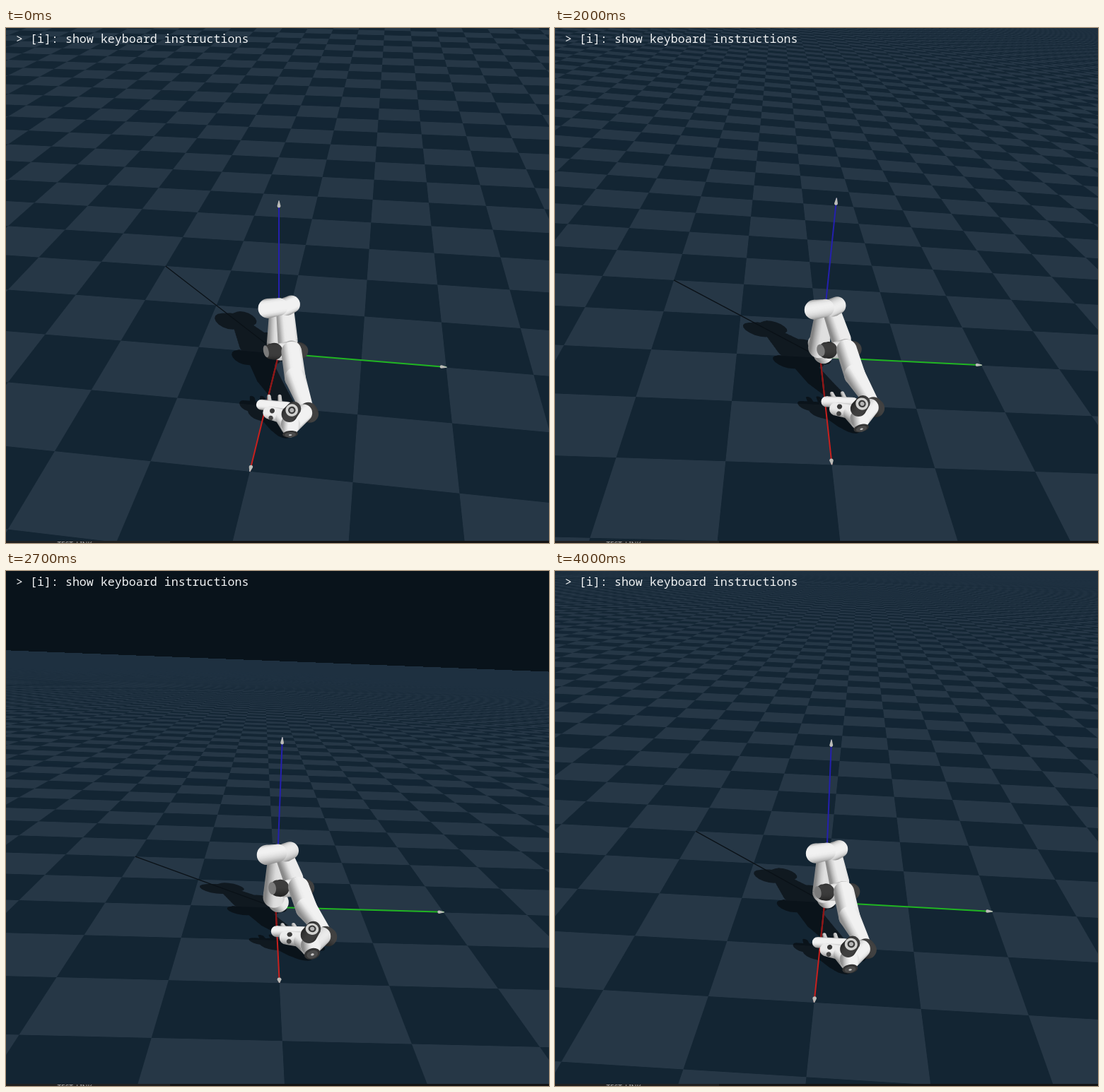
Animation, 768 px wide and 729 px high, one loop 4.2 s. Source, as an HTML page with a canvas:

```html
<!DOCTYPE html>
<html lang="en">
<head>
<meta charset="utf-8">
<title>Robot arm viewer</title>
<style>
  html, body { margin: 0; width: 768px; height: 729px; overflow: hidden; background: #09131b; }
  canvas { position: absolute; left: 0; top: 0; }
  .hint { position: absolute; left: 14px; top: 3px; font: 16.65px/24px "Noto Sans Mono", "DejaVu Sans Mono", monospace; color: #f1f3f4; white-space: pre; }
  .bar { position: absolute; left: 0; top: 726px; width: 768px; height: 3px; overflow: hidden; background: linear-gradient(90deg, #212121 232px, #141414 232px); }
  .bar span { position: absolute; left: 62px; top: 0; font: 10px/10px "Noto Sans", sans-serif; color: #a4a4a4; white-space: pre; }
</style>
</head>
<body>
<canvas id="view" width="768" height="726"></canvas>
<div class="hint">&gt; [i]: show keyboard instructions</div>
<div class="bar"><span>··  TEST_LINK</span></div>
<script>
const W = 768, H = 726, LOOP = 4200, STEP = 100;
const CX = 386, CY = 360, FOCAL = 1000, DIST = 4.06, PITCH = 0.5149;
const SA = Math.sin(0.1419), CA = Math.cos(0.1419);
const ctx = document.getElementById('view').getContext('2d');
const floor = ctx.createImageData(W, H);

// Camera drag: time, yaw, tilt
const DRAG = [
  [1200, 0, 0], [1800, 0.084, 0], [2200, 0.348, 0.225],
  [2500, 0.338, 0.374], [2900, 0.004, 0.18], [3600, 0.104, 0.134]
];

function dragAt(t, col) {
  const last = DRAG.length - 1;
  if (t <= DRAG[0][0]) return DRAG[0][col];
  if (t >= DRAG[last][0]) return DRAG[last][col];
  const slope = i => (DRAG[i + 1][col] - DRAG[i][col]) / (DRAG[i + 1][0] - DRAG[i][0]);
  const tangent = i => {
    if (i === 0 || i === last) return 0;
    const a = slope(i - 1), b = slope(i);
    return a * b > 0 ? 2 * a * b / (a + b) : 0;
  };
  let i = 0;
  while (t > DRAG[i + 1][0]) i++;
  const h = DRAG[i + 1][0] - DRAG[i][0], s = (t - DRAG[i][0]) / h, r = 1 - s;
  return DRAG[i][col] * (1 + 2 * s) * r * r + h * tangent(i) * s * r * r
    + DRAG[i + 1][col] * s * s * (3 - 2 * s) - h * tangent(i + 1) * s * s * r;
}

// Points are [right, toward, up], aligned with the starting camera
let cy, sy, cp, sp;
function setCamera(yaw, tilt) {
  cy = Math.cos(yaw); sy = Math.sin(yaw);
  cp = Math.cos(PITCH - tilt); sp = Math.sin(PITCH - tilt);
}
function rotate([x, t, z]) {
  const depth = sp * z + cp * t;
  return [x * cy + depth * sy, cp * z - sp * t, depth * cy - x * sy];
}
function project([x, t, z]) {
  const v = rotate([x, t, z - 0.5]), k = FOCAL / (DIST - v[2]);
  return [CX + v[0] * k, CY - v[1] * k, k];
}
const fromWorld = (x, y, z) => [CA * y - SA * x, CA * x + SA * y, z];
const mix = (a, b, s) => a.map((v, i) => v + (b[i] - v) * s);

// Box-filtered square wave
function wave(p, w) {
  const a = (p - w / 2) / 2, b = (p + w / 2) / 2;
  return 2 * (Math.abs(a - Math.floor(a) - 0.5) - Math.abs(b - Math.floor(b) - 0.5)) / w;
}

const DARK = [19, 37, 51], LIGHT = [38, 55, 70], HAZE = [31, 50, 68], SKY = [9, 19, 27];
const SHARP = 0.75;

function drawFloor() {
  const px = floor.data;
  const camX = -DIST * sy, camZ = 0.5 + sp * DIST * cy, camT = cp * DIST * cy;
  const toU = (x, t) => 2 * (CA * t - SA * x), toV = (x, t) => 2 * (CA * x + SA * t);
  const u0 = toU(camX, camT), v0 = toV(camX, camT);
  const zx = sp * sy, ux = toU(cy, cp * sy), vx = toV(cy, cp * sy);
  const uy = toU(0, -sp), vy = toV(0, -sp);
  let o = 0;
  for (let j = 0; j < H; j++) {
    const Y = (CY - j - 0.5) / FOCAL;
    for (let i = 0; i < W; i++, o += 4) {
      const X = (i + 0.5 - CX) / FOCAL;
      const back = X * sy - cy, dx = X * cy + sy;
      const dz = cp * Y + sp * back, dt = cp * back - sp * Y;
      let r = SKY[0], g = SKY[1], b = SKY[2];
      if (dz < -0.0005) {
        const k = -camZ / dz, U = toU(dx, dt), V = toV(dx, dt), e = SHARP * k / FOCAL;
        const wu = e * (Math.abs(ux - U * zx / dz) + Math.abs(uy - U * cp / dz)) + 1e-4;
        const wv = e * (Math.abs(vx - V * zx / dz) + Math.abs(vy - V * cp / dz)) + 1e-4;
        const m = 0.5 + 0.5 * wave(u0 + k * U, wu) * wave(v0 + k * V, wv);
        const haze = 0.5 * Math.min(1, Math.max(0, (k - 5) / 55));
        r = DARK[0] + (LIGHT[0] - DARK[0]) * m; r += (HAZE[0] - r) * haze;
        g = DARK[1] + (LIGHT[1] - DARK[1]) * m; g += (HAZE[1] - g) * haze;
        b = DARK[2] + (LIGHT[2] - DARK[2]) * m; b += (HAZE[2] - b) * haze;
      }
      px[o] = r; px[o + 1] = g; px[o + 2] = b; px[o + 3] = 255;
    }
  }
  ctx.putImageData(floor, 0, 0);
}

const LAMP = [0.49, 0.653, 0.577];
const FALL = [-0.8486, -1.1314];

function line(a, b, color, width) {
  const p = project(a), q = project(b);
  ctx.strokeStyle = color;
  ctx.lineWidth = width;
  ctx.beginPath();
  ctx.moveTo(p[0], p[1]);
  ctx.lineTo(q[0], q[1]);
  ctx.stroke();
}

function axis(x, y, z, color, inner) {
  const lift = 0.003, o = [0, 0, lift], tip = fromWorld(x, y, z + lift);
  line(o, tip, color, 2);
  if (inner) line(o, mix(o, tip, 0.45), inner, 2);
  const p = project(mix(o, tip, 0.972)), q = project(mix(o, tip, 1.004));
  const a = Math.atan2(q[1] - p[1], q[0] - p[0]), r = 0.0095 * p[2];
  const nx = -Math.sin(a) * r, ny = Math.cos(a) * r;
  ctx.fillStyle = '#bcbcb8';
  ctx.beginPath();
  ctx.arc(p[0], p[1], r, a + Math.PI / 2, a + Math.PI * 1.5);
  ctx.lineTo(q[0] - nx * 0.2, q[1] - ny * 0.2);
  ctx.lineTo(q[0] + nx * 0.2, q[1] + ny * 0.2);
  ctx.fill();
}

function capsule([a, b, ra, rb, tone]) {
  const p = project(a), q = project(b);
  const r1 = ra * p[2], r2 = rb * q[2], r = Math.max(r1, r2);
  const ang = Math.atan2(q[1] - p[1], q[0] - p[0]), h = Math.PI / 2;
  const nx = -Math.sin(ang), ny = Math.cos(ang);
  const l = rotate(LAMP), side = nx * l[0] - ny * l[1];
  const mx = (p[0] + q[0]) / 2, my = (p[1] + q[1]) / 2;
  const fill = ctx.createLinearGradient(mx - nx * r, my - ny * r, mx + nx * r, my + ny * r);
  for (let i = 0; i <= 8; i++) {
    const s = i / 4 - 1, lit = s * side + Math.sqrt(1 - s * s) * l[2];
    const c = Math.round(241 * tone * Math.min(1, 0.58 + 0.58 * Math.max(0, lit)));
    fill.addColorStop(i / 8, `rgb(${c},${c},${c})`);
  }
  ctx.fillStyle = fill;
  ctx.beginPath();
  ctx.arc(p[0], p[1], r1, 0, 4 * h);
  ctx.closePath();
  ctx.moveTo(q[0] + r2, q[1]);
  ctx.arc(q[0], q[1], r2, 0, 4 * h);
  ctx.closePath();
  ctx.moveTo(q[0] - nx * r2, q[1] - ny * r2);
  ctx.lineTo(q[0] + nx * r2, q[1] + ny * r2);
  ctx.lineTo(p[0] + nx * r1, p[1] + ny * r1);
  ctx.lineTo(p[0] - nx * r1, p[1] - ny * r1);
  ctx.fill();
}

function disc(c, n, r, color) {
  const len = Math.hypot(...n), [nx, nt, nz] = n.map(v => v / len);
  const flat = Math.hypot(nx, nt);
  const e = [-nt / flat, nx / flat, 0];
  const f = [-nz * e[1], nz * e[0], nx * e[1] - nt * e[0]];
  ctx.fillStyle = color;
  ctx.beginPath();
  for (let i = 0; i < 24; i++) {
    const a = i * Math.PI / 12, ca = r * Math.cos(a), sa = r * Math.sin(a);
    const p = project(c.map((v, k) => v + e[k] * ca + f[k] * sa));
    ctx.lineTo(p[0], p[1]);
  }
  ctx.fill();
}

function shadows(parts) {
  ctx.fillStyle = 'rgba(7,11,15,0.68)';
  ctx.beginPath();
  const n = Math.hypot(...FALL), [lx, lt] = FALL.map(v => v / n);
  for (const [a, b, ra, rb] of parts) {
    for (let i = 0; i <= 10; i++) {
      const [x, t, z] = mix(a, b, i / 10), r = 1.12 * (ra + (rb - ra) * i / 10);
      for (let k = 0; k < 16; k++) {
        const u = 1.73 * r * Math.cos(k * Math.PI / 8), v = r * Math.sin(k * Math.PI / 8);
        const p = project([x + FALL[0] * z + lx * u - lt * v, t + FALL[1] * z + lt * u + lx * v, 0]);
        k ? ctx.lineTo(p[0], p[1]) : ctx.moveTo(p[0], p[1]);
      }
      ctx.closePath();
    }
  }
  ctx.fill();
}

function drawRobot(t) {
  const sway = -0.004 * Math.min(1, t / 1200), droop = -0.000002 * t;
  const at = (x, f, z) => [x + sway, f, z + droop];

  const body = [
    [[-0.01, -0.1, 0.045], [0.01, 0.03, 0.045], 0.05, 0.06, 0.97],
    [[-0.01, -0.02, 0.06], [-0.005, 0, 0.3], 0.064, 0.052, 0.93],
    [[0.035, 0.005, 0.325], [0.05, 0.235, 0.255], 0.052, 0.056, 0.98],
    [[0.045, 0, 0.338], [0.072, -0.01, 0.346], 0.054, 0.052, 1],
    [[-0.064, 0, 0.324], [0.0, 0, 0.335], 0.058, 0.052, 1],
    [[0.112, 0.265, 0.21], [0.118, 0.27, 0.21], 0.046, 0.046, 0.27],
    [[-0.005, 0.27, 0.205], [0.07, 0.28, 0.22], 0.044, 0.055, 0.98],
    [[-0.04, 0.28, 0.214], [-0.026, 0.28, 0.214], 0.045, 0.047, 0.25]
  ];
  const arm = [
    [[0.07, 0.3, 0.225], at(0.088, 0.46, 0.165), 0.057, 0.057, 1],
    [at(0.088, 0.46, 0.165), at(0.143, 0.64, 0.105), 0.057, 0.037, 1]
  ];
  const fingers = [
    [at(-0.053, 0.55, 0.112), at(-0.05, 0.59, 0.11), 0.01, 0.012, 0.85],
    [at(0.004, 0.55, 0.112), at(0.006, 0.6, 0.11), 0.01, 0.012, 0.85]
  ];
  const hand = [
    [at(-0.092, 0.605, 0.1), at(0.045, 0.625, 0.103), 0.028, 0.026, 1],
    [at(-0.05, 0.65, 0.083), at(0.035, 0.685, 0.085), 0.034, 0.04, 0.98]
  ];
  const wrist = [
    [at(0.154, 0.64, 0.085), at(0.16, 0.66, 0.085), 0.047, 0.047, 0.27],
    [at(0.02, 0.69, 0.08), at(0.055, 0.735, 0.065), 0.038, 0.046, 0.98],
    [at(0.128, 0.66, 0.09), at(0.06, 0.725, 0.068), 0.046, 0.05, 1],
    [at(0.06, 0.725, 0.068), at(0.058, 0.755, 0.055), 0.049, 0.036, 1],
    [at(0.054, 0.7, 0.115), at(0.077, 0.69, 0.143), 0.041, 0.037, 0.26]
  ];

  shadows([...body, ...arm, ...fingers, ...hand, ...wrist]);
  line([0, 0, 0], [...FALL, 0], '#0a1117', 1.3);
  axis(1, 0, 0, '#c8201e', '#8c1718');
  axis(0, 1, 0, '#20b522');
  axis(0, 0, 1, '#2420ae');

  body.forEach(capsule);
  disc([-0.072, 0.28, 0.214], [-1, 0.55, 0.1], 0.034, '#7b7b7b');
  arm.forEach(capsule);
  fingers.forEach(capsule);
  hand.forEach(capsule);
  disc(at(-0.035, 0.66, 0.104), [-0.2, 0.6, 0.7], 0.013, '#3a3a3a');
  disc(at(-0.042, 0.685, 0.078), [-0.2, 0.8, 0.5], 0.012, '#444');
  wrist.forEach(capsule);

  const face = [-0.1, 0.6, 0.75];
  disc(at(0.066, 0.71, 0.15), face, 0.032, '#d2d2d0');
  disc(at(0.066, 0.712, 0.152), face, 0.019, '#3a3a3a');
  disc(at(0.066, 0.714, 0.153), face, 0.011, '#b4b4b4');
  const cap = [0.05, 0.85, -0.35];
  disc(at(0.058, 0.774, 0.047), cap, 0.039, '#343434');
  disc(at(0.058, 0.778, 0.046), cap, 0.028, '#4b4b4b');
  disc(at(0.058, 0.78, 0.046), cap, 0.008, '#c9c9c9');
}

let shown = -1;
const start = performance.now();
function tick() {
  const elapsed = (performance.now() - start) % LOOP;
  const t = Math.min(4000, Math.floor(elapsed / STEP) * STEP);
  if (t !== shown) {
    shown = t;
    setCamera(dragAt(t, 1), dragAt(t, 2));
    drawFloor();
    drawRobot(t);
  }
  requestAnimationFrame(tick);
}
tick();
</script>
</body>
</html>
```
